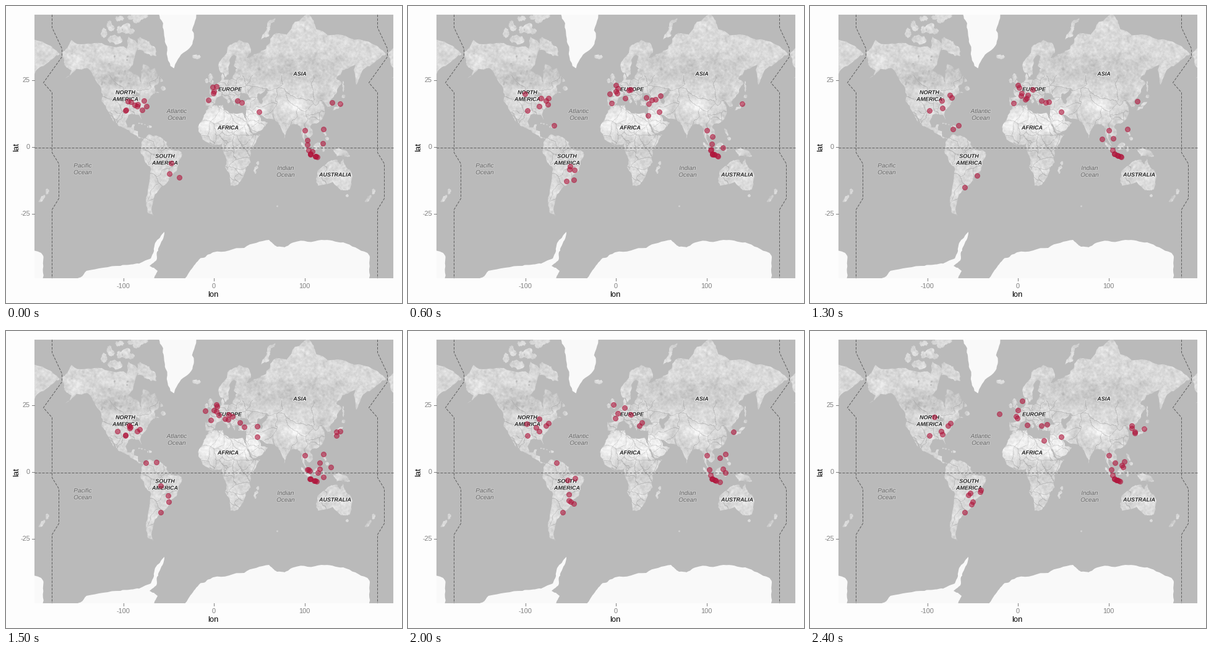
Animation, 640 px wide and 480 px high, one loop 2.5 s. Source, as a matplotlib script:

```python
import matplotlib.pyplot as plt
import numpy as np
from matplotlib import patheffects
from matplotlib.animation import FuncAnimation
from matplotlib.patches import PathPatch, Rectangle
from matplotlib.path import Path

W, H, DPI, FRAMES = 640, 480, 100, 25
LEFT, RIGHT, TOP, BOTTOM = 46, 626, 14, 440
X0, Y0, PX_DEG, PX_RAD = 336, 228, 1.465, 97
TURN = 360 * PX_DEG
PX = 72 / DPI
OCEAN = "#bababa"
rng = np.random.default_rng(5)


# --- map geometry -------------------------------------------------------
def pairs(nums):
    return np.array(nums, float).reshape(-1, 2)


def project(nums):
    lon, lat = pairs(nums).T
    merc = np.log(np.tan(np.pi / 4 + np.radians(lat) / 2))
    return np.column_stack([X0 + PX_DEG * lon, Y0 - PX_RAD * merc])


def rough(p, amount):
    """Break straight coast segments into small random bays."""
    for _ in range(3):
        step = np.roll(p, -1, 0) - p
        bump = rng.normal(0, amount, (len(p), 1)) * step[:, ::-1] * [1, -1]
        p = np.stack([p, p + step / 2 + bump], 1).reshape(-1, 2)
    return p


def add(group, p, amount=0.08):
    p = rough(p, amount)
    x, y = p.T
    if np.sum(x * np.roll(y, -1) - y * np.roll(x, -1)) < 0:
        p = p[::-1]
    p = np.vstack([p, p[:1]])
    group += [Path(p + [s * TURN, 0], closed=True) for s in (-1, 0, 1)]


def blob(group, lon, lat, rx, ry, tilt=0):
    a, t = np.linspace(0, 2 * np.pi, 8, endpoint=False), np.radians(tilt)
    u, v = rx * np.cos(a), ry * np.sin(a)
    turned = np.column_stack([u * np.cos(t) - v * np.sin(t),
                              u * np.sin(t) + v * np.cos(t)])
    add(group, project([lon, lat]) + turned, 0.14)


lands, ices, lakes = [], [], []


def land(*nums):
    add(lands, project(nums))


# North America
land(-168, 66, -157, 71, -128, 70, -96, 68, -94, 72, -82, 69, -94, 59,
     -82, 55, -80, 51.5, -78, 62, -70, 59, -65, 60, -56, 53, -66, 50, -65, 47,
     -60, 46, -70, 43, -76, 36, -81, 31, -80, 25.5, -83, 29.5, -94, 29.5,
     -97.5, 24, -95, 18.5, -91, 18.7, -90, 21, -87, 21, -88, 16, -83.5, 15,
     -83, 10, -77, 8, -83, 8.5, -94, 16, -105.5, 20, -114, 31, -110, 23,
     -117, 32.6, -124, 40, -124, 48, -133, 56, -140, 60, -152, 59.5,
     -164, 54.7, -157, 58.7, -165, 61.5)
# South America
land(-77, 8, -72, 12, -62, 10.5, -52, 5, -50, 0, -38, -3.5, -35, -7,
     -39, -13, -41, -22, -48, -26, -54, -34, -58, -35, -62, -39, -67, -46,
     -69, -51, -66, -55, -73, -53, -75, -47, -71, -30, -70.3, -18.4,
     -76, -14, -81, -5, -80, 1)
# Africa
land(-6, 35.8, 10, 37.3, 11, 33.5, 20, 30.5, 32, 31.2, 37, 21, 43, 11.6,
     51.2, 11.8, 40, -3, 40.5, -14.5, 35, -20, 32.7, -27, 26, -34,
     18.5, -34.5, 12, -18, 13.7, -11, 9, 0, 9.5, 4, -7.5, 4.4, -17, 14.7,
     -16.5, 21, -10, 30)
# Europe and Scandinavia
land(-9, 37, -9, 43.2, -1.5, 43.4, -4.7, 48.4, 4, 52, 8.5, 54, 9, 57.5,
     11, 54, 20, 54.5, 24, 59.3, 30, 60, 34, 64.5, 44, 66, 60, 69, 62, 50,
     48, 44, 48.5, 38, 36, 36.6, 27, 36.8, 27, 40.5, 41, 41.4, 37, 45,
     30, 46, 28, 42, 23, 40.5, 23, 36.5, 19.4, 41.5, 13.8, 45.6, 18, 40,
     16, 38, 9, 44.4, 3, 42.5, -2, 36.8)
land(30, 60, 22, 61, 25, 65, 22, 65.7, 17.5, 62, 16.5, 57, 13, 55.4, 7, 58,
     5, 61.5, 15, 68.5, 28, 71, 41, 67, 33, 63)
# Asia, north and south
land(60, 55, 58, 69, 69, 73, 80, 72.5, 104, 77.6, 113, 74, 140, 72.5,
     180, 69, 190, 66, 177, 62.5, 163.5, 58.5, 157, 51, 156, 61.5, 142, 59,
     135, 54.6, 141, 52, 132, 43, 127.5, 39.5, 129, 36, 126.5, 34.5,
     121.5, 40, 118, 39, 122, 36, 122, 30, 114, 22.3, 108, 21.6, 80, 35,
     60, 45)
land(44, 40, 62, 48, 105, 35, 108, 21.6, 106, 19, 109, 12, 105, 9,
     100, 13.4, 104, 1.4, 98.4, 8.5, 97, 17, 92, 21.5, 87, 21.5, 80, 15,
     77.5, 8, 73, 20, 67, 25, 57, 26.5, 48, 30, 52, 24.2, 59.7, 22.4, 54, 17,
     43, 13, 35, 28, 36, 36.6)
# Australia
land(114, -22.5, 126, -14, 136, -12, 140, -17.5, 142.5, -10.8, 146, -19,
     153, -26, 150, -37.5, 140, -38, 131, -31.5, 115, -34.5)

# Islands: lon, lat, half sizes in pixels, tilt
for island in ((-3, 54.5, 4, 9, -15), (-8, 53.3, 3, 4), (-19, 65, 7, 4),
               (137, 36.5, 11, 2.5, -40), (143, 43.5, 3, 3),
               (142.7, 50, 1.5, 9), (122, 14, 2, 7, -25), (125, 8, 3, 3),
               (114, 1, 7, 5, -45), (101, 0, 11, 3, 45), (110, -7.4, 7, 1.5, 8),
               (121, -2, 2, 5), (141, -5.5, 15, 5, 20), (47, -19, 3, 11, 15),
               (147, -42, 2.5, 2.5), (176, -39, 3, 5), (170.5, -44, 2.5, 8, 40),
               (-79.5, 21.5, 7, 1.5, 12), (-71, 19, 4, 2), (-56, 48.7, 4, 4),
               (-74, 68.5, 21, 8, 42), (-109, 71, 12, 8), (-121, 73, 5, 8),
               (-82, 77.5, 14, 9), (60, 74.2, 3.5, 21, 33), (70, -49, 1.5, 1.5)):
    blob(lands, *island)
for _ in range(9):
    blob(lands, rng.uniform(-118, -85), rng.uniform(73, 77), *rng.uniform(4, 8, 2))

blob(lakes, 51, 42, 4, 9, -15)
blob(lakes, -86, 44.5, 6, 4)
blob(lakes, 33, -1, 2, 2)
for _ in range(14):
    blob(lakes, rng.uniform(-124, -92), rng.uniform(51, 67), *rng.uniform(1, 2.5, 2))

# Ice: Greenland, then Antarctica in pixels
add(ices, project([-62, 78.5, -56, 75.5, -54, 71, -52, 66, -48, 61, -44, 59.9,
                   -41, 63, -25, 69, -22, 72, -19, 78]), 0.05)
add(ices, pairs([288, 445, 300, 425, 318, 407, 335, 398, 385, 391, 425, 378,
                 438, 389, 450, 390, 465, 382, 510, 378, 545, 382, 584, 399,
                 588, 406, 586, 445]), 0.05)
add(ices, pairs([108, 445, 130, 428, 185, 420, 212, 416, 234, 408, 241, 383,
                 256, 365, 247, 390, 243, 411, 232, 420, 245, 428, 238, 445]),
    0.05)


# --- land shading -------------------------------------------------------
def grain(shape, size, amount):
    n = rng.normal(size=shape)
    box = np.ones(size) / size
    for axis in (0, 1, 0, 1):
        n = np.apply_along_axis(np.convolve, axis, n, box, mode="same")
    return n * amount / n.std()


def nearest_seed(x, y, seeds):
    best, owner = np.full(x.shape, np.inf), np.zeros(x.shape, int)
    for k, (sx, sy) in enumerate(seeds):
        d = (x - sx) ** 2 + (y - sy) ** 2
        closer = d < best
        best[closer], owner[closer] = d[closer], k
    return owner


def relief():
    """Climate zones, grain and country borders as random cells."""
    y, x = np.mgrid[TOP:BOTTOM, LEFT:RIGHT] + 0.5
    g = np.full(x.shape, 0.85)
    for cx, cy, rx, ry, amount in ((356, 187, 50, 20, 0.09),
                                   (402, 185, 18, 18, 0.05),
                                   (468, 161, 26, 12, 0.07),
                                   (365, 228, 25, 18, -0.03),
                                   (245, 232, 25, 20, -0.02),
                                   (200, 112, 58, 20, -0.07),
                                   (460, 100, 80, 24, -0.06),
                                   (505, 165, 22, 25, -0.03)):
        g += amount * np.exp(-((x - cx) / rx) ** 4 - ((y - cy) / ry) ** 4)
    for size, amount in ((1, 0.008), (3, 0.018), (9, 0.015)):
        g += grain(x.shape, size, amount)

    seeds = np.vstack([rng.uniform((cx - rx, cy - ry), (cx + rx, cy + ry), (n, 2))
                       for cx, cy, rx, ry, n in ((363, 220, 45, 60, 36),
                                                 (365, 135, 38, 22, 26),
                                                 (255, 265, 28, 50, 14),
                                                 (455, 165, 60, 28, 14),
                                                 (200, 158, 42, 28, 14))])
    cell = nearest_seed(x + grain(x.shape, 9, 2), y + grain(x.shape, 9, 2), seeds)
    edge = (cell != np.roll(cell, 1, 0)) | (cell != np.roll(cell, 1, 1))
    g[edge & (y > 112)] -= 0.1
    return np.clip(g, 0.7, 0.97)


# --- stage --------------------------------------------------------------
plt.rcParams["font.family"] = "Liberation Sans"
fig = plt.figure(figsize=(W / DPI, H / DPI), dpi=DPI, facecolor="#fdfdfd")
ax = fig.add_axes([0, 0, 1, 1])
ax.axis("off")

panel = Rectangle((LEFT, TOP), RIGHT - LEFT, BOTTOM - TOP, fc=OCEAN, lw=0)
ax.add_patch(panel)
ground = ax.imshow(relief(), cmap="gray", vmin=0, vmax=1, aspect="auto",
                   extent=(LEFT, RIGHT, BOTTOM, TOP), zorder=1)
ax.set(xlim=(0, W), ylim=(H, 0))
ground.set_clip_path(Path.make_compound_path(*lands), ax.transData)
for group, color in ((lakes, OCEAN), (ices, "#f9f9f9")):
    shape = PathPatch(Path.make_compound_path(*group), fc=color, lw=0, zorder=2)
    ax.add_patch(shape)
    shape.set_clip_path(panel)

dash = dict(color="#606060", lw=PX, ls=(0, (4, 2)), zorder=3)
ax.plot([LEFT, RIGHT], [229, 229], **dash)
date_x = np.array([74, 74, 90, 90, 60, 74, 74, 85, 85, 74, 74]) + 0.5
date_y = [14, 35, 69, 82, 124, 140, 237, 255, 311, 329, 440]
for shift in (0, 526):
    ax.plot(date_x + shift, date_y, **dash)


def label(x, y, words, color, halo, **font):
    for k, word in enumerate(words.split()):
        t = ax.text(x, y + 11 * k, word, style="italic", color=color,
                    ha="center", va="center", zorder=4, **font)
        t.set_path_effects([patheffects.withStroke(linewidth=1.6,
                                                   foreground=halo)])


for x, y, words in ((193, 140, "NORTH AMERICA"), (257, 243, "SOUTH AMERICA"),
                    (362, 135, "EUROPE"), (475, 110, "ASIA"),
                    (359, 197, "AFRICA"), (532, 273, "AUSTRALIA")):
    label(x, y, words, "#222222", "#f0f0f0", size=9 * PX, weight="bold")
for x, y, words in ((276, 170, "Atlantic Ocean"), (124, 258, "Pacific Ocean"),
                    (452, 262, "Indian Ocean")):
    label(x, y, words, "#686868", "#c8c8c8", size=10 * PX)

tick = dict(color="#7f7f7f", lw=PX)
note = dict(size=11 * PX, color="#7f7f7f", va="center")
for step in (-1, 0, 1):
    x, y = X0 + 146.5 * step, Y0 - 108 * step
    ax.plot([x, x], [BOTTOM, BOTTOM + 4], **tick)
    ax.plot([LEFT - 4, LEFT], [y, y], **tick)
    ax.text(x, 453.5, f"{100 * step}", ha="center", **note)
    ax.text(39, y, f"{25 * step}", ha="right", **note)
title = dict(size=13 * PX, ha="center", va="center")
ax.text(335, 466.5, "lon", **title)
ax.text(17, 228, "lat", rotation=90, **title)

# --- dots ---------------------------------------------------------------
# Cities that light up often, and regions with stray dots
cities = pairs([227, 149, 223, 153, 212, 162, 193, 169, 250, 293, 263, 276,
                332, 119, 336, 128, 340, 130, 339, 133, 329, 157, 335, 141,
                360, 135, 374, 153, 378, 148, 381, 156, 406, 171, 483, 201,
                487, 224, 489, 233, 513, 199, 540, 158])
regions = ((210, 156, 13, 8, 3), (264, 265, 9, 9, 3), (235, 205, 8, 8, 1),
           (343, 135, 14, 10, 4), (393, 163, 12, 12, 2), (502, 222, 11, 7, 3),
           (531, 158, 6, 5, 1))
ink = (0.69, 0.09, 0.24, 0.6)
dots = ax.scatter([], [], s=(8 * PX) ** 2, facecolor=[ink], edgecolor=[ink],
                  linewidth=PX, zorder=5)


def dots_at(i):
    r = np.random.default_rng(i)
    lit = cities[r.random(len(cities)) < 0.6]
    stray = [r.normal((cx, cy), (sx, sy), (r.poisson(n), 2))
             for cx, cy, sx, sy, n in regions]
    java = r.uniform(0, 13, (5, 1)) * [1, 0.38] + [491, 239]
    return np.vstack([lit, *stray, java, [[492, 239]] * 2])


def update(i):
    dots.set_offsets(dots_at(i))
    return (dots,)


anim = FuncAnimation(fig, update, frames=FRAMES, interval=100, repeat=True,
                     repeat_delay=0)
plt.show()
```
